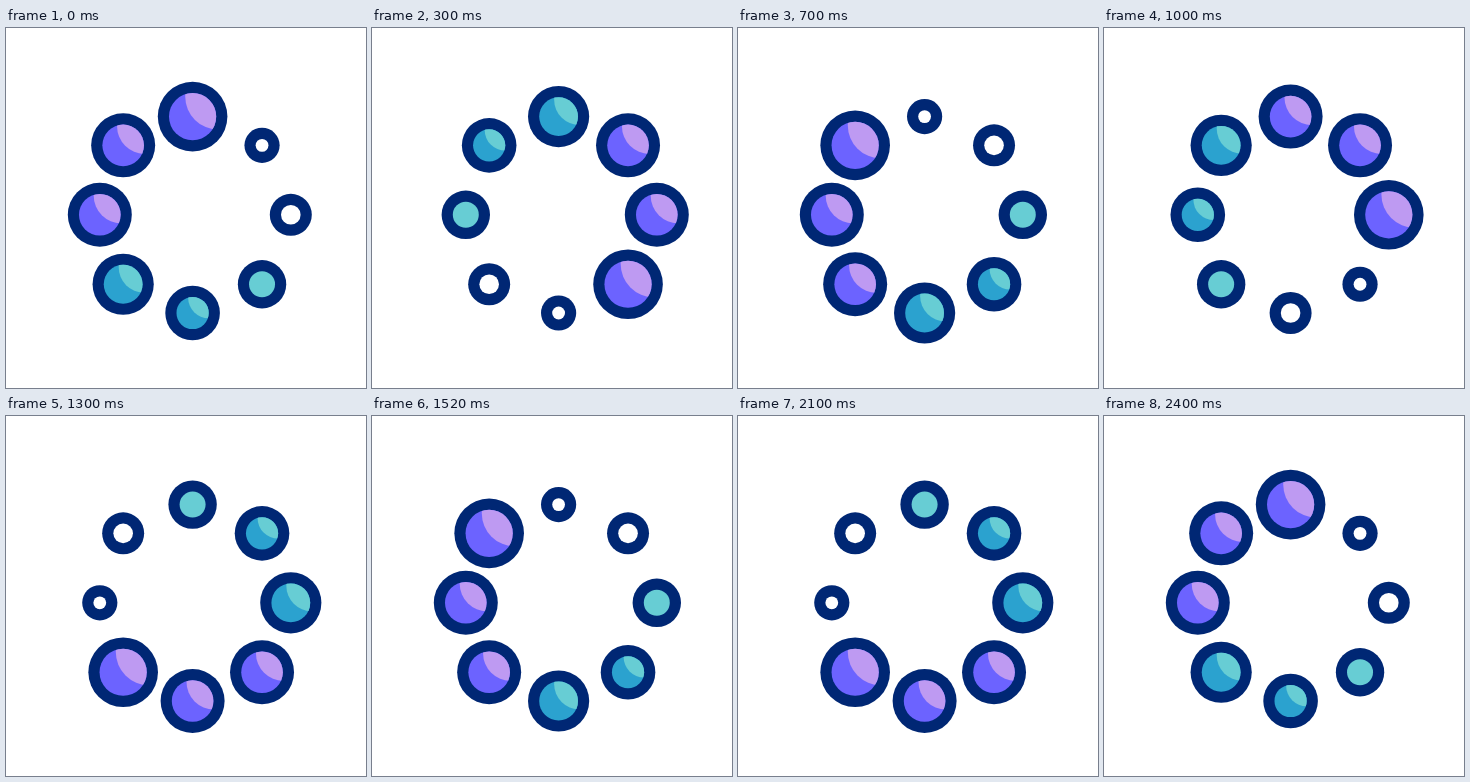
An HTML page with a canvas that plays this animation: 360x360 px, repeating every 2.42 s.

```html
<!DOCTYPE html>
<html lang="en">
<head>
<meta charset="utf-8">
<title>Loading ring</title>
<style>
html, body { margin: 0; width: 100%; height: 100%; overflow: hidden; background: #fff; }
canvas { display: block; width: 360px; height: 360px; }
</style>
</head>
<body>
<canvas id="stage"></canvas>
<script>
const LOOP = 2420, STEP = 100, COUNT = 8;
const CX = 186.6, CY = 186.8, RADIUS = 98.2, RING = 11.2;
const NAVY = '#002774';
const PURPLE = ['#6c63ff', '#be9af2'];
const TEAL = ['#2ba2cf', '#67cdd4'];

// Ball styles from the head of the trail back to its end.
// from / to: angles in degrees where the highlight's edge meets the rim.
const balls = [
  { r: 34.8, fill: PURPLE, from: 252, to: 32 },
  { r: 32, fill: PURPLE, from: 253, to: 24 },
  { r: 32, fill: PURPLE, from: 253, to: 24 },
  { r: 30.6, fill: TEAL, from: 257, to: 25 },
  { r: 27.3, fill: TEAL, from: 254, to: 19 },
  { r: 24.2, fill: [TEAL[1]] },
  { r: 21, fill: ['#fff'] },
  { r: 17.6, fill: ['#fff'] }
];

const canvas = document.getElementById('stage');
const ctx = canvas.getContext('2d');
const scale = window.devicePixelRatio || 1;
canvas.width = canvas.height = 360 * scale;

const rad = deg => deg * Math.PI / 180;

function disc(x, y, r, color) {
  ctx.beginPath();
  ctx.arc(x, y, r, 0, Math.PI * 2);
  ctx.fillStyle = color;
  ctx.fill();
}

// The highlight is the part of a larger disc that overlaps the ball.
function highlight(x, y, r, ball) {
  const a = rad(ball.from - 360), b = rad(ball.to);
  const mid = (a + b) / 2, half = (b - a) / 2;
  const chord = r * Math.sin(half), sag = r * 0.36;
  const big = (chord * chord + sag * sag) / (2 * sag);
  const dist = r * Math.cos(half) + big - sag;
  ctx.save();
  ctx.beginPath();
  ctx.arc(x, y, r, 0, Math.PI * 2);
  ctx.clip();
  disc(x + dist * Math.cos(mid), y + dist * Math.sin(mid), big, ball.fill[1]);
  ctx.restore();
}

function place(slot) {
  const a = rad(slot * 45 - 90);
  // The leftmost place sits a little further in.
  const x = slot === 6 ? 93.8 : CX + RADIUS * Math.cos(a);
  return [x, CY + RADIUS * Math.sin(a)];
}

function draw(time) {
  const head = Math.floor(time % LOOP / STEP) % COUNT;
  ctx.setTransform(scale, 0, 0, scale, 0, 0);
  ctx.fillStyle = '#fff';
  ctx.fillRect(0, 0, 360, 360);
  balls.forEach((ball, i) => {
    const [x, y] = place((head - i + COUNT) % COUNT);
    const inner = ball.r - RING;
    disc(x, y, ball.r, NAVY);
    disc(x, y, inner, ball.fill[0]);
    if (ball.fill[1]) highlight(x, y, inner, ball);
  });
}

const start = performance.now();
function tick() {
  draw(performance.now() - start);
  requestAnimationFrame(tick);
}
tick();
</script>
</body>
</html>
```
